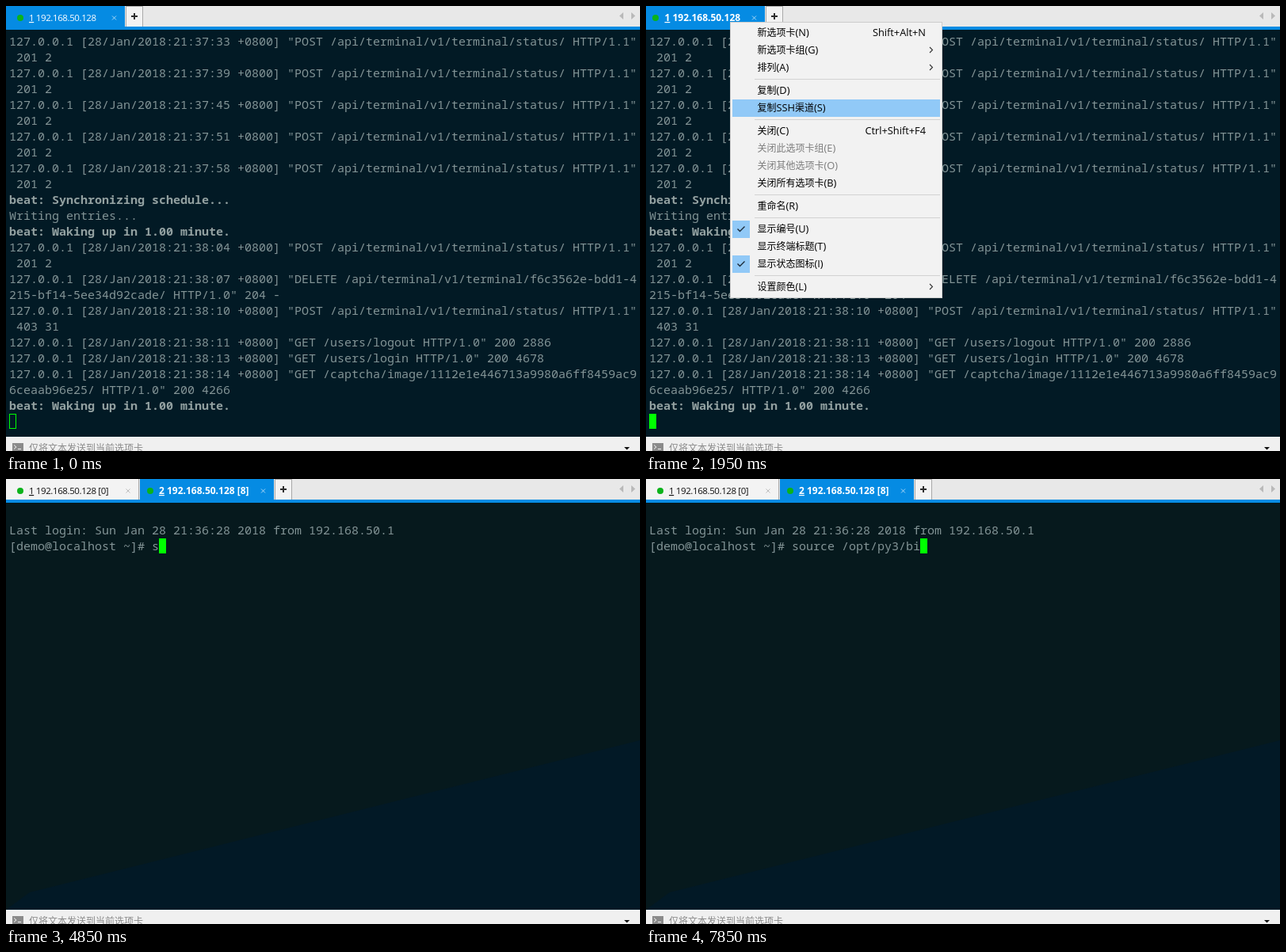
Recreate the animation shown at these times as an HTML page. Size 800 by 562 pixels, loop 8 s.

```html
<!DOCTYPE html>
<html lang="zh-CN">
<head>
<meta charset="utf-8">
<title>Terminal tabs</title>
<style>
  html, body { margin: 0; width: 100%; height: 100%; overflow: hidden; background: #021a25; }
  svg { display: block; width: 800px; height: 562px; }
  text { white-space: pre; }
  .term { font: 15px "Noto Sans Mono", "Liberation Mono", monospace; fill: #839496; }
  .strong { font-weight: 700; fill: #93a1a1; }
  .ui { font: 12px "Noto Sans CJK SC", "Noto Sans CJK", sans-serif; }
  .ui .latin { font: 12.8px "Open Sans", "Noto Sans", sans-serif; }
  .tab { font: 11.5px "Open Sans", "Noto Sans", sans-serif; letter-spacing: -.4px; }
  .tab.bold { font-size: 12px; font-weight: 700; letter-spacing: 0; }
  .key { text-decoration: underline; }
</style>
</head>
<body>
<svg id="stage" viewBox="0 0 800 562" xmlns="http://www.w3.org/2000/svg"></svg>
<script>
const LOOP = 8000, CELL = 9, ROW = 20, LEFT = 4, TOP = 35;
const BLUE = '#058be3', GREEN = '#00ff00', HOVER = '#91c9f7';
const stage = document.getElementById('stage');

function el(parent, name, attrs = {}, text) {
  const node = document.createElementNS('http://www.w3.org/2000/svg', name);
  for (const key in attrs) node.setAttribute(key, attrs[key]);
  if (text !== undefined) node.textContent = text;
  parent.appendChild(node);
  return node;
}
const group = parent => el(parent, 'g');
const rect = (parent, x, y, width, height, fill, more = {}) =>
  el(parent, 'rect', { x, y, width, height, fill, ...more });
const path = (parent, d, stroke, width = 1) =>
  el(parent, 'path', { d, stroke, 'stroke-width': width, fill: 'none' });
const shape = (parent, d, fill) => el(parent, 'path', { d, fill });
const show = (node, on) => node.setAttribute('display', on ? 'inline' : 'none');

function line(parent, row, text, strong) {
  return el(parent, 'text', {
    x: LEFT, y: TOP + row * ROW + 15, class: strong ? 'term strong' : 'term'
  }, text);
}

// Latin runs are set a little larger than the Chinese ones
function label(parent, x, y, text, fill, anchor = 'start') {
  const node = el(parent, 'text', { x, y, fill, class: 'ui', 'text-anchor': anchor });
  for (const run of text.match(/[\x20-\x7e]+|[^\x20-\x7e]+/g))
    el(node, 'tspan', run < '\x7f' ? { class: 'latin' } : {}, run);
}

function tabText(parent, x, key, title, fill, bold) {
  const node = el(parent, 'text', { x, y: 19, fill, class: bold ? 'tab bold' : 'tab' });
  el(node, 'tspan', { class: 'key' }, key);
  el(node, 'tspan', {}, ' ' + title);
}
const dot = (parent, x) =>
  el(parent, 'circle', { cx: x, cy: 15, r: 4, fill: '#0bb31b' });
const cross = (parent, x, stroke) =>
  path(parent, `M${x - 2.5} 12.5l5 5m0 -5l-5 5`, stroke);

function plusButton(parent, x) {
  rect(parent, x + .5, .5, 21, 26, '#f3f3f3', { stroke: '#a9a9a9' });
  path(parent, `M${x + 7} 13h8m-4 -4v8`, '#2d2d2d', 2);
}

// Window frame
rect(stage, 0, 0, 800, 27, '#e8e8e8');
shape(stage, 'M779 8v9l-5 -4.5z', '#b9b9b9');
shape(stage, 'M789 8v9l5 -4.5z', '#b9b9b9');

// First session
const first = group(stage);
rect(first, 0, 30, 800, 514, '#021a25');
rect(first, 0, 0, 150, 27, BLUE);
plusButton(first, 151);
cross(first, 136.5, '#a9d6f5');
const idle = group(first), focused = group(first);
dot(idle, 18);
tabText(idle, 29, '1', '192.168.50.128', '#fff');
rect(idle, 4.5, 515.5, 8, 18, 'none', { stroke: GREEN });
dot(focused, 12);
tabText(focused, 23.5, '1', '192.168.50.128', '#fff', true);
rect(focused, 4, 515, 9, 19, GREEN);

const request = (time, rest) => `127.0.0.1 [28/Jan/2018:21:${time} +0800] "${rest}`;
const post = time => request(time, 'POST /api/terminal/v1/terminal/status/ HTTP/1.1"');
const log = [];
for (const time of ['37:33', '37:39', '37:45', '37:51', '37:58'])
  log.push(post(time), ' 201 2');
log.push(
  'beat: Synchronizing schedule...',
  'Writing entries...',
  'beat: Waking up in 1.00 minute.',
  post('38:04'), ' 201 2',
  request('38:07', 'DELETE /api/terminal/v1/terminal/f6c3562e-bdd1-4'),
  '215-bf14-5ee34d92cade/ HTTP/1.0" 204 -',
  post('38:10'), ' 403 31',
  request('38:11', 'GET /users/logout HTTP/1.0" 200 2886'),
  request('38:13', 'GET /users/login HTTP/1.0" 200 4678'),
  request('38:14', 'GET /captcha/image/1112e1e446713a9980a6ff8459ac9'),
  '6ceaab96e25/ HTTP/1.0" 200 4266',
  'beat: Waking up in 1.00 minute.'
);
log.forEach((text, row) => line(first, row, text, text.startsWith('beat:')));

// Second session
const second = group(stage);
rect(second, 0, 30, 800, 514, '#06191d');
shape(second, 'M30 522L800 330V544H0z', '#021926');
rect(second, 0, 0, 167, 27, '#f3f3f3');
path(second, 'M167.5 0v27', '#a9a9a9');
dot(second, 18);
tabText(second, 29, '1', '192.168.50.128 [0]', '#111');
cross(second, 154, '#bcbcbc');
rect(second, 169, 0, 169, 27, BLUE);
dot(second, 182);
tabText(second, 193, '2', '192.168.50.128 [8]', '#fff', true);
cross(second, 324.5, '#a9d6f5');
plusButton(second, 339);
const greeting = line(second, 1, 'Last login: Sun Jan 28 21:36:28 2018 from 192.168.50.1');
const prompt = line(second, 2, '');
const cursor = rect(second, LEFT, TOP, CELL, 19, GREEN);

rect(stage, 0, 26, 800, 4, BLUE);

// Bottom bar
rect(stage, 0, 544, 800, 18, '#f0f0f0');
rect(stage, 8, 552, 14, 10, '#8b8b8b');
path(stage, 'M10 554.5l3 2.5l-3 2.5M15 559.5h4', '#f0f0f0');
label(stage, 29, 563, '仅将文本发送到当前选项卡', '#8a8a8a');
shape(stage, 'M780 557h7l-3.5 3.5z', '#111');

// Context menu: middle of the row, text, and options
const menu = group(stage);
rect(menu, 106.5, 20.5, 267, 348, '#f2f2f2', { stroke: '#cccccc' });
const hover = rect(menu, 109, 0, 262, 22, HOVER);
for (const y of [92.5, 143.5, 238.5, 267.5, 340.5])
  path(menu, `M137 ${y}H371`, '#d2d2d2');
const items = [
  [34, '新选项卡(N)', { keys: 'Shift+Alt+N' }],
  [56, '新选项卡组(G)', { more: true }],
  [78, '排列(A)', { more: true }],
  [107, '复制(D)'],
  [129, '复制SSH渠道(S)'],
  [158, '关闭(C)', { keys: 'Ctrl+Shift+F4' }],
  [180, '关闭此选项卡组(E)', { off: true }],
  [202, '关闭其他选项卡(O)', { off: true }],
  [224, '关闭所有选项卡(B)'],
  [253, '重命名(R)'],
  [282, '显示编号(U)', { checked: true }],
  [304, '显示终端标题(T)'],
  [326, '显示状态图标(I)', { checked: true }],
  [355, '设置颜色(L)', { more: true }]
];
for (const [y, text, { keys, more, off, checked } = {}] of items) {
  if (checked) {
    rect(menu, 109, y - 11, 22, 22, HOVER);
    path(menu, `M115.5 ${y - .5}l3 3l6 -6`, '#1c2b38', 1.4);
  }
  label(menu, 140.5, y + 4, text, off ? '#7d7d7d' : '#000');
  if (keys) label(menu, 353, y + 4, keys, '#000', 'end');
  if (more) path(menu, `M358 ${y - 4}l3.5 3.5l-3.5 3.5`, '#333', 1.1);
}

// Timelines hold [start, value] pairs
const at = (steps, t) => steps.reduce((value, [start, next]) => t >= start ? next : value, 0);
const fade = [[1650, .48], [1700, .8], [1750, 1], [2500, 0]];
const pointed = [[1800, 56], [1850, 78], [1900, 107], [1950, 129]];
const command = 'source /opt/py3/bi';
const typed = [
  [4850, 1], [5100, 2], [5250, 4], [5350, 7], [6000, 8], [6200, 9], [6300, 11],
  [6350, 12], [6900, 13], [7250, 14], [7400, 16], [7800, 17], [7850, 18]
];

function draw(t) {
  const opened = t >= 2550, ready = t >= 2750, active = t >= 550;
  show(first, !opened);
  show(second, opened);
  show(idle, !active);
  show(focused, active);

  const opacity = at(fade, t), row = at(pointed, t);
  show(menu, opacity > 0);
  menu.setAttribute('opacity', opacity);
  show(hover, row > 0);
  hover.setAttribute('y', row - 11);

  const text = ready ? '[demo@localhost ~]# ' + command.slice(0, at(typed, t)) : '';
  show(greeting, t >= 2700);
  prompt.textContent = text;
  cursor.setAttribute('x', LEFT + text.length * CELL);
  cursor.setAttribute('y', TOP + (ready ? 2 : t >= 2700 ? 2 : 0) * ROW);
}

const begin = performance.now();
function tick() {
  draw((performance.now() - begin) % LOOP);
  requestAnimationFrame(tick);
}
tick();
</script>
</body>
</html>
```
